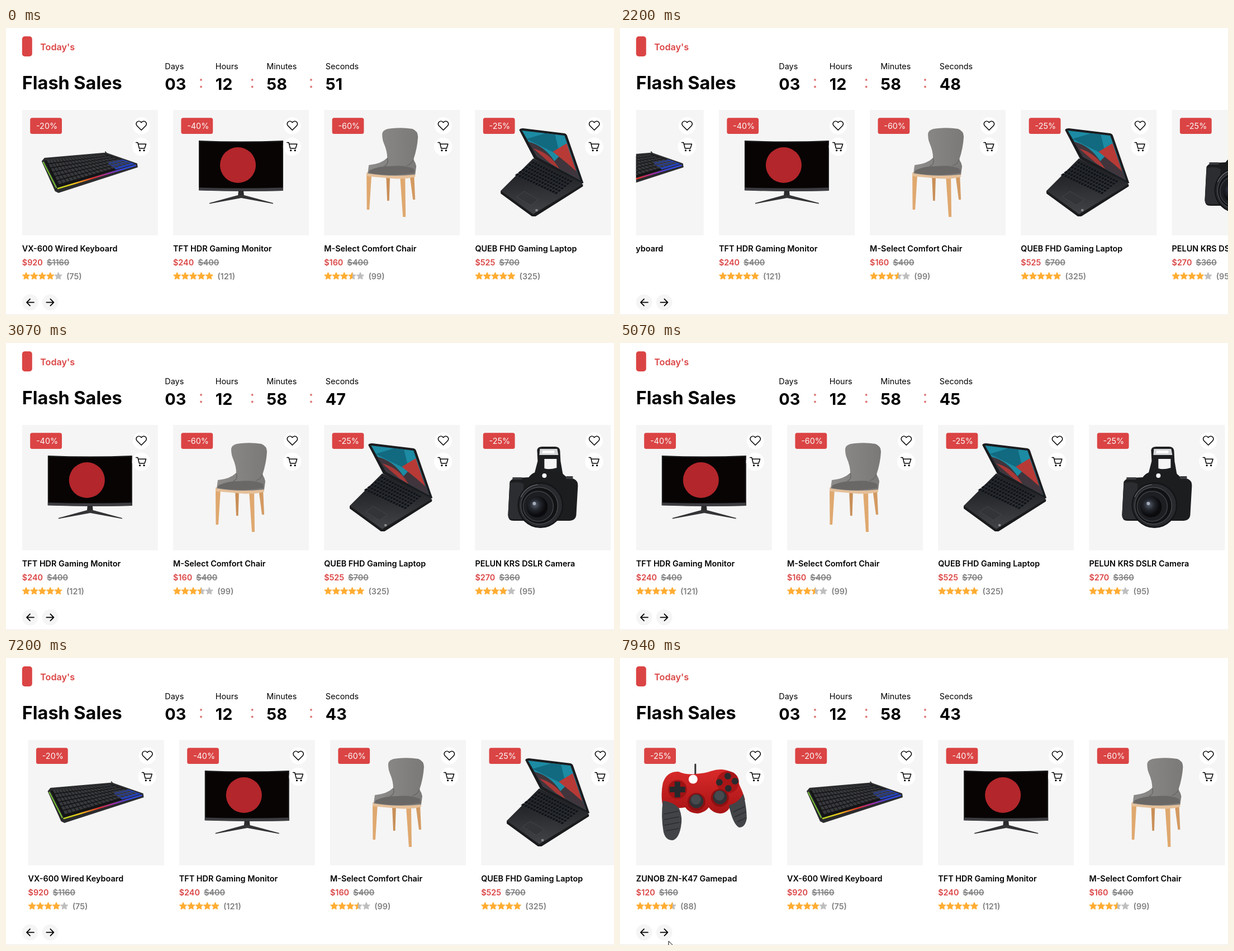
Recreate the animation shown at these times as an HTML page. Size 1088 by 515 pixels, loop 8000 ms.

```html
<!DOCTYPE html>
<html lang="en">
<head>
<meta charset="utf-8">
<title>Flash Sales</title>
<style>
html, body { margin: 0; width: 100%; height: 100%; overflow: hidden; background: #fff; }
svg { display: block; }
text { font: 600 14.4px Inter, sans-serif; }
.line { fill: none; stroke: #000; stroke-width: 1.5; stroke-linecap: round; stroke-linejoin: round; }
.arrow { stroke-width: 1.8; }
.heart { stroke-width: 1.7; }
.old { fill: #808080; text-decoration: line-through; }
.badge { font-weight: 400; fill: #fafafa; }
.label { font-weight: 400; }
.num { font-size: 28.8px; font-weight: 700; }
.star { stroke-width: 2.8; stroke-linejoin: round; }
</style>
</head>
<body>
<svg id="stage" width="1088" height="515" viewBox="0 0 1088 515">
  <defs>
    <clipPath id="view"><rect x="28.8" y="140" width="1060" height="330"/></clipPath>
    <linearGradient id="half">
      <stop offset=".5" stop-color="#ffad33"/><stop offset=".5" stop-color="#bfbfbf"/>
    </linearGradient>
    <linearGradient id="rainbow">
      <stop offset="0" stop-color="#b5d321"/><stop offset=".22" stop-color="#f5c518"/>
      <stop offset=".45" stop-color="#e0312c"/><stop offset=".65" stop-color="#a02bb0"/>
      <stop offset=".85" stop-color="#2f4be0"/>
    </linearGradient>
    <linearGradient id="fabric">
      <stop offset="0" stop-color="#8e8c8a"/><stop offset="1" stop-color="#7b7977"/>
    </linearGradient>
    <linearGradient id="deck" x2="0" y2="1">
      <stop offset=".3" stop-color="#232427"/><stop offset="1" stop-color="#444548"/>
    </linearGradient>
    <linearGradient id="shell" x2="0" y2="1">
      <stop offset="0" stop-color="#d92a2a"/><stop offset="1" stop-color="#a81315"/>
    </linearGradient>
    <radialGradient id="glass" cx=".4" cy=".4">
      <stop offset="0" stop-color="#59606e"/><stop offset=".5" stop-color="#23262d"/>
      <stop offset="1" stop-color="#0b0b0d"/>
    </radialGradient>
  </defs>
  <rect x="28.8" y="15" width="18" height="36" rx="4.8" fill="#db4444"/>
  <text x="61.2" y="39.8" fill="#db4444" style="font-size:16.2px">Today's</text>
  <text x="28.8" y="110" style="font-size:32.4px;font-weight:700">Flash Sales</text>
  <g id="clock"></g>
  <g clip-path="url(#view)"><g id="track"></g></g>
  <circle cx="43.2" cy="492.3" r="14.4" fill="#f5f5f5"/>
  <circle cx="79.2" cy="492.3" r="14.4" fill="#f5f5f5"/>
  <path class="line arrow" d="M43 486.3l-6 6 6 6M37 492.3h13M79.4 486.3l6 6-6 6M85.4 492.3h-13"/>
  <path d="M0 514.5H1088" stroke="#ececec"/>
  <path id="cursor" d="M87 508v16l4-3.5 3 6 2.5-1-3-6h5z" fill="#fff" stroke="#000"/>
</svg>
<script>
const byId = id => document.getElementById(id);
const path = (d, fill, more = '') => `<path d="${d}" fill="${fill}" ${more}/>`;
const stroke = (d, color, width) => path(d, 'none', `stroke="${color}" stroke-width="${width}" stroke-linecap="round"`);
const disc = (x, y, r, fill, more = '') => `<circle cx="${x}" cy="${y}" r="${r}" fill="${fill}" ${more}/>`;

// Keycaps spread over a four-cornered plane: top left, top right, bottom right, bottom left
function keycaps([a, b, c, d], rows, cols) {
  const at = (u, v) => [0, 1].map(i =>
    ((a[i] * (1 - u) + b[i] * u) * (1 - v) + (d[i] * (1 - u) + c[i] * u) * v).toFixed(1));
  let out = '';
  for (let r = 0; r < rows; r++) for (let k = 0; k < cols; k++) {
    const [l, t, w, h] = [k / cols, r / rows, .8 / cols, .76 / rows];
    out += `M${at(l, t)}L${at(l + w, t)}L${at(l + w, t + h)}L${at(l, t + h)}Z`;
  }
  return out;
}

const gamepad =
  stroke('M106 191V208', '#333', 3) +
  path('M48 224Q55 203 76 204Q90 210 106 208Q124 207 134 203Q154 196 171 205Q186 224 195 254Q185 264 170 263Q164 279 150 279Q137 278 130 268Q124 277 110 279Q94 278 88 268Q70 272 47 262Q44 242 48 224Z', 'url(#shell)') +
  path('M48 256Q66 258 77 270Q84 286 80 304Q76 324 66 327Q53 328 49 312Q44 284 48 256Z', '#424447') +
  path('M166 264Q182 261 192 244Q198 268 198 288Q195 305 184 304Q173 298 166 264Z', '#424447') +
  stroke('M50 280l25-5M50 290l27-5M51 300l26-5M54 310l22-4M174 276l20-9M177 285l19-9M181 294l15-7', '#2c2d30', 1.5) +
  disc(74, 236, 17, '#a01214') + path('M69 222h10v9h9v10h-9v9h-10v-9h-9v-10h9z', '#26282b') +
  disc(164, 223, 20, '#a81517') +
  [[149, 223], [164, 212], [177, 221], [165, 234]].map(p => disc(...p, 6, '#292a2d')).join('') +
  disc(108, 258, 16, '#8d1012') + disc(108, 257, 12.5, '#303236') + disc(107, 254, 9, '#46494d') +
  disc(150, 251, 16, '#8d1012') + disc(150, 250, 12.5, '#303236') + disc(149, 247, 9, '#46494d') +
  disc(102, 217.5, 8, '#fff');

const keyboard =
  stroke('M149 222l3 4', '#222', 1.5) +
  path('M35 239L40 233 150 223.5 206 243 207 250 65 296 59 293Z', '#2b2c2e') +
  path('M40 238L148 226.5 202 244 64 287Z', '#141416') +
  path('M150 240L180 236 202 244 168 254Z', '#2442b8') +
  path(keycaps([[44, 237], [147, 227], [198, 243], [67, 282]], 6, 19), '#38393c') +
  stroke('M38 241L61 286', '#79c534', 2) +
  stroke('M64 288L203 246.5', 'url(#rainbow)', 2.5);

const monitor =
  path('M46 202Q121 205 197 202V292Q121 294 46 291Z', '#161617') +
  path('M48 204.5Q121 207 195 204.5V286Q121 288 48 286Z', '#080404') +
  path('M46 286.5Q121 289 197 286.5V292Q121 294 46 291.5Z', '#3d3d41') +
  disc(116, 246, 32, '#b3262b') +
  path('M117 292h9l1 10h-11z', '#2c2c2e') +
  path('M116 300h11l52 14v1.5L122 305 65 315.5v-1.5z', '#343437');

const chair =
  path('M111 264h7l-1.5 46h-3.5z', '#c98f58') +
  path('M153 262h8l2 46h-4z', '#d39a62') +
  path('M76 262h9l-4 64h-4.5z', '#dfa86f') +
  path('M136 266h9l1 73h-5z', '#dfa86f') +
  path('M76 259Q118 268 163 260V267Q145 272 122 270L76 266Z', '#e5c09a') +
  path('M104 191Q104 181 122 180Q140 178 158 181Q168 185 168 195Q167 215 160 236Q164 242 165 248L163 263Q120 268 78 261L80 246Q102 244 113 233Q113 221 107 207Q104 200 104 191Z', 'url(#fabric)') +
  path('M82 255Q100 247 118 248Q146 245 161 253L162 260Q120 268 79 260Z', '#6a6866') +
  stroke('M113 234Q117 243 108 248M160 236Q156 245 148 247', '#656361', 1.2);

const laptop =
  path('M79 183Q80 180 86 180L160 189Q164 190 165 194L194 278 189 280 106 235Z', '#1b1c1f') +
  path('M84 184L160 193 188 273 111 231Z', '#1c8ba3') +
  path('M92 199L126 189 143 191 152 229Z', '#126a80') +
  path('M111 231L95 204Q124 211 142 239L166 214 188 273Z', '#40353c') +
  path('M104 216Q134 224 151 253L135 243Z', '#a93836') +
  path('M139 222L164 207 181 257 165 243Z', '#b83a36') +
  path('M104 234L191 278 193 284 108 338H102L46 297V292Z', 'url(#deck)') +
  path('M46 292L104 334 193 280V284L108 338H102L46 297Z', '#1a1b1d') +
  path(keycaps([[104, 239], [176, 275], [145, 300], [70, 265]], 6, 15), '#111215', 'stroke="#3b4654" stroke-width=".35"') +
  path('M88 293L113 308 99 318 74 303Z', '#333437', 'stroke="#505155" stroke-width=".6"') +
  path('M108 325h4v4h-4z', '#8a8b8d');

const camera =
  path('M111 192Q112 186 120 186H143Q151 186 152 193L153 212 157 235H106L112 212ZM124 208V225Q132 228 146 224V208Z', '#1d1e20', 'fill-rule="evenodd"') +
  path('M116 190H147L149 201H115Z', '#d5d7d8') + path('M121 193H142V198H120Z', '#fafafa') +
  path('M62 249Q65 243 76 242L96 241Q101 234 108 232H154L164 241 177 244Q184 247 184 256L181 309Q180 318 169 319H69Q59 319 59 309Z', '#1c1d1f') +
  path('M62 252Q75 247 87 253L85 316H69Q59 316 59 309Z', '#2c2d30') +
  path('M67 241h17v4h-17zM163 239h12v5h-12z', '#3b3c3f') +
  disc(124, 238, 4, '#fff') +
  disc(117, 291, 41, '#141517') + disc(117, 291, 38.5, '#292a2d') +
  disc(115, 292, 33, '#111214', 'stroke="#595b60" stroke-width="1"') +
  disc(113, 293, 27, '#1d1e21', 'stroke="#3f4146" stroke-width="1.5"') +
  disc(111, 294, 19, 'url(#glass)') + disc(106, 288, 3, '#a6aebb') +
  stroke('M82 276Q91 257 112 254', '#6c6e72', 1.2);

const products = [
  ['ZUNOB ZN-K47 Gamepad', 25, 120, 160, 4.5, 88, gamepad],
  ['VX-600 Wired Keyboard', 20, 920, 1160, 4, 75, keyboard],
  ['TFT HDR Gaming Monitor', 40, 240, 400, 5, 121, monitor],
  ['M-Select Comfort Chair', 60, 160, 400, 3.5, 99, chair],
  ['QUEB FHD Gaming Laptop', 25, 525, 700, 5, 325, laptop],
  ['PELUN KRS DSLR Camera', 25, 270, 360, 4, 95, camera]
];
const left = 28.8, pitch = 270.2;

const starShape = 'M12 17.27L18.18 21l-1.64-7.03L22 9.24l-7.19-.61L12 2 9.19 8.63 2 9.24l5.46 4.73L5.82 21z';

function stars(rating) {
  let out = '';
  for (let i = 0; i < 5; i++) {
    const rest = rating - i;
    const color = rest >= 1 ? '#ffad33' : rest > 0 ? 'url(#half)' : '#bfbfbf';
    out += path(starShape, color, `class="star" stroke="${color}" transform="translate(${i * 14.4} 437.8) scale(.6)"`);
  }
  return out;
}

function card([name, off, price, old, rating, reviews, art], i) {
  return `<g transform="translate(${left + i * pitch} 0)">
    <rect y="147" width="243" height="225" fill="#f5f5f5"/>${art}
    <rect x="14.4" y="161.3" width="56.8" height="28.8" rx="3.6" fill="#db4444"/>
    <text class="badge" x="25.2" y="181">-${off}%</text>
    ${disc(213.3, 175.5, 15.3, '#fff')}${disc(213, 213, 16.2, '#fff')}
    <path class="line heart" transform="translate(202.8 164.6) scale(.88)" d="M20.84 4.61a5.5 5.5 0 0 0-7.78 0L12 5.67l-1.06-1.06a5.5 5.5 0 0 0-7.78 7.78L12 21.23l8.84-8.84a5.5 5.5 0 0 0 0-7.78z"/>
    <path class="line" d="M203.8 205.5h3.2l2.7 10.5h9.5l2.5-7.7h-14"/>
    ${disc(210.7, 219.7, 1.6, '#000')}${disc(218.2, 219.7, 1.6, '#000')}
    <text y="400.6">${name}</text>
    <text y="425.8" fill="#db4444">$${price}<tspan class="old" dx="7.2">$${old}</tspan></text>
    ${stars(rating)}
    <text x="79.2" y="450.8" fill="#808080">(${reviews})</text>
  </g>`;
}

byId('track').innerHTML = products.map(card).join('');
byId('clock').innerHTML =
  [['Days', '03', 284.5], ['Hours', '12', 375], ['Minutes', '58', 466.5], ['Seconds', '51', 572]]
    .map(([label, n, x]) => `<text class="label" x="${x - .2}" y="74">${label}</text>
      <text class="num" id="${label}" x="${x - .2}" y="111">${n}</text>`).join('') +
  [349, 440.7, 546].map(x => disc(x, 93, 1.9, '#e07575') + disc(x, 105.5, 1.9, '#e07575')).join('');

// The ease-in-out curve, cubic-bezier(.42, 0, .58, 1)
function ease(x) {
  if (x <= 0) return 0;
  if (x >= 1) return 1;
  let lo = 0, hi = 1, s;
  for (let i = 0; i < 24; i++) {
    s = (lo + hi) / 2;
    const q = 1 - s;
    if (1.26 * s * q * q + 1.74 * s * s * q + s ** 3 < x) lo = s; else hi = s;
  }
  return s * s * (3 - 2 * s);
}

function draw(now) {
  const t = now % 8000;
  const slide = 1 + ease((t - 1965) / 500) - 2 * ease((t - 6913) / 563);
  byId('track').setAttribute('transform', `translate(${-slide * pitch} 0)`);
  byId('Seconds').textContent = 51 - Math.floor((t + 940) / 1000);
  byId('cursor').style.display = t >= 7940 ? '' : 'none';
}

const start = performance.now();
function tick() {
  draw(performance.now() - start);
  requestAnimationFrame(tick);
}
tick();
</script>
</body>
</html>
```
